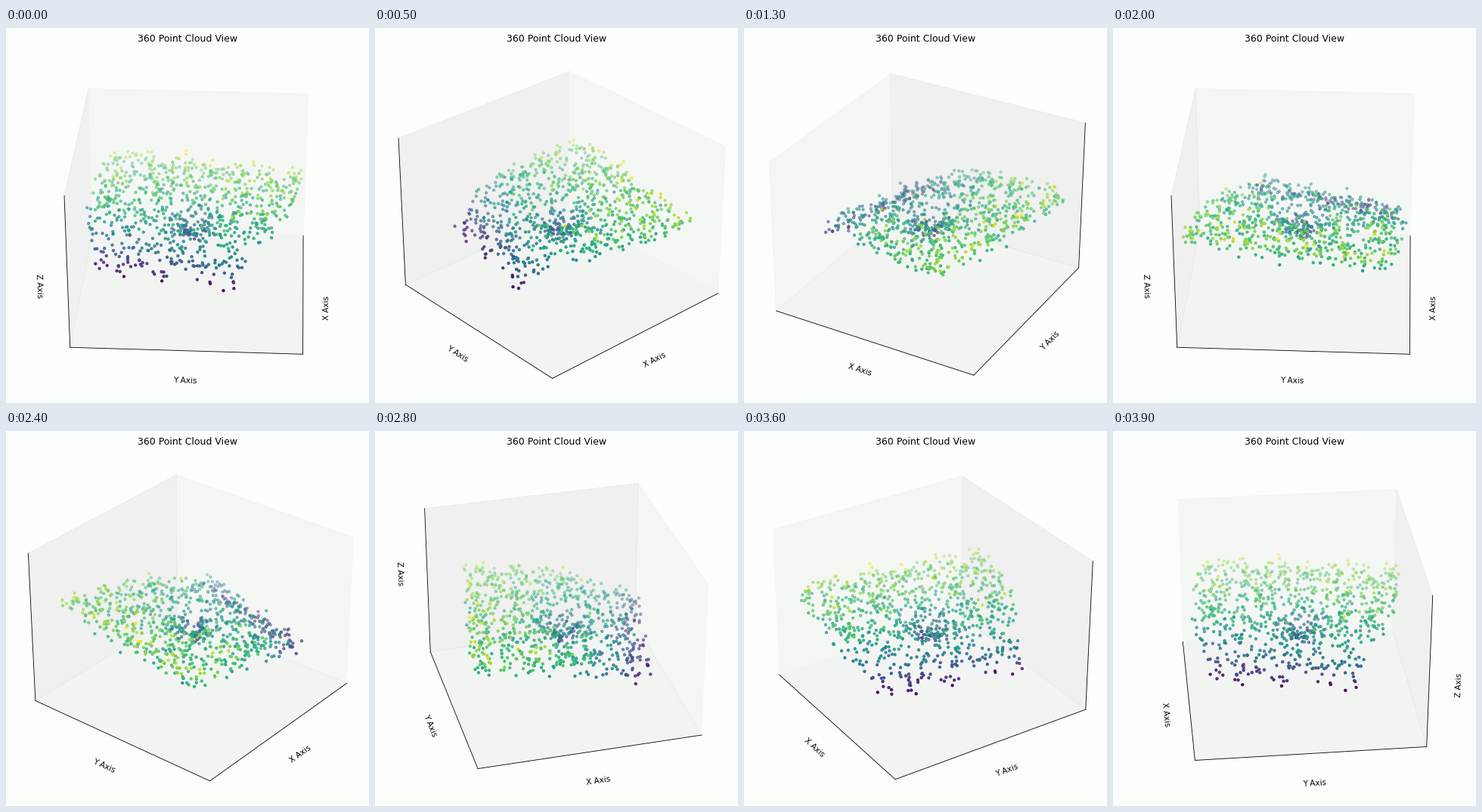
Recreate the animation shown at these times as a matplotlib script. Size 480x497 px, loop 4000 ms.

```python
import numpy as np
import matplotlib.pyplot as plt
from matplotlib.animation import FuncAnimation
from matplotlib.path import Path

W, H, DPI = 480, 497, 75
FRAMES, INTERVAL = 40, 100
BACK = "#fcfefc"
SIDE, TALL = 0.5952, 0.4464  # half sizes of the box

rng = np.random.default_rng(11)
OUTLINE = Path([(-0.4, 0.59), (0.15, 0.49), (0.27, 0.33), (0.53, 0.27),
                (0.35, -0.47), (-0.1, -0.59), (-0.59, -0.47)])


def height(x, y):
    """A sheet dropping off along one edge, with a pit in the middle."""
    s = 0.94 * x - 0.34 * y
    slope = -0.035 - 0.06 * s - 0.07 * np.tanh(7 * (s - 0.33))
    pit = 0.12 * np.exp(-(x**2 + y**2) / 0.12**2)
    return slope - pit + rng.normal(0, 0.025, len(x))


def make_cloud(count=840, extra=60):
    xy = rng.uniform(-SIDE, SIDE, (4 * count, 2))
    xy = xy[OUTLINE.contains_points(xy)][:count]
    x, y = np.vstack([xy, rng.normal(0, 0.06, (extra, 2))]).T
    return x, y, height(x, y)


fig = plt.figure(figsize=(W / DPI, H / DPI), dpi=DPI, facecolor=BACK)
ax = fig.add_axes([7.5 / W, 7.5 / H, 465 / W, 465 / H], projection="3d",
                  facecolor=BACK)
x, y, z = make_cloud()
ax.scatter(x, y, z, c=z, cmap="viridis", s=10, vmin=-0.14, vmax=0.125)
ax.set(xlim=(-SIDE, SIDE), ylim=(-SIDE, SIDE), zlim=(-TALL, TALL),
       xticks=[], yticks=[], zticks=[],
       xlabel="X Axis", ylabel="Y Axis", zlabel="Z Axis")
ax.set_title("360 Point Cloud View")
for axis, grey in ((ax.xaxis, 0.935), (ax.yaxis, 0.89), (ax.zaxis, 0.915)):
    axis.set_pane_color((grey, grey + 0.005, grey, 0.5))


def update(i):
    ax.view_init(elev=30, azim=3 + 360 * i / FRAMES)
    return []


anim = FuncAnimation(fig, update, frames=FRAMES, interval=INTERVAL,
                     repeat=True, repeat_delay=0)
plt.show()
```
